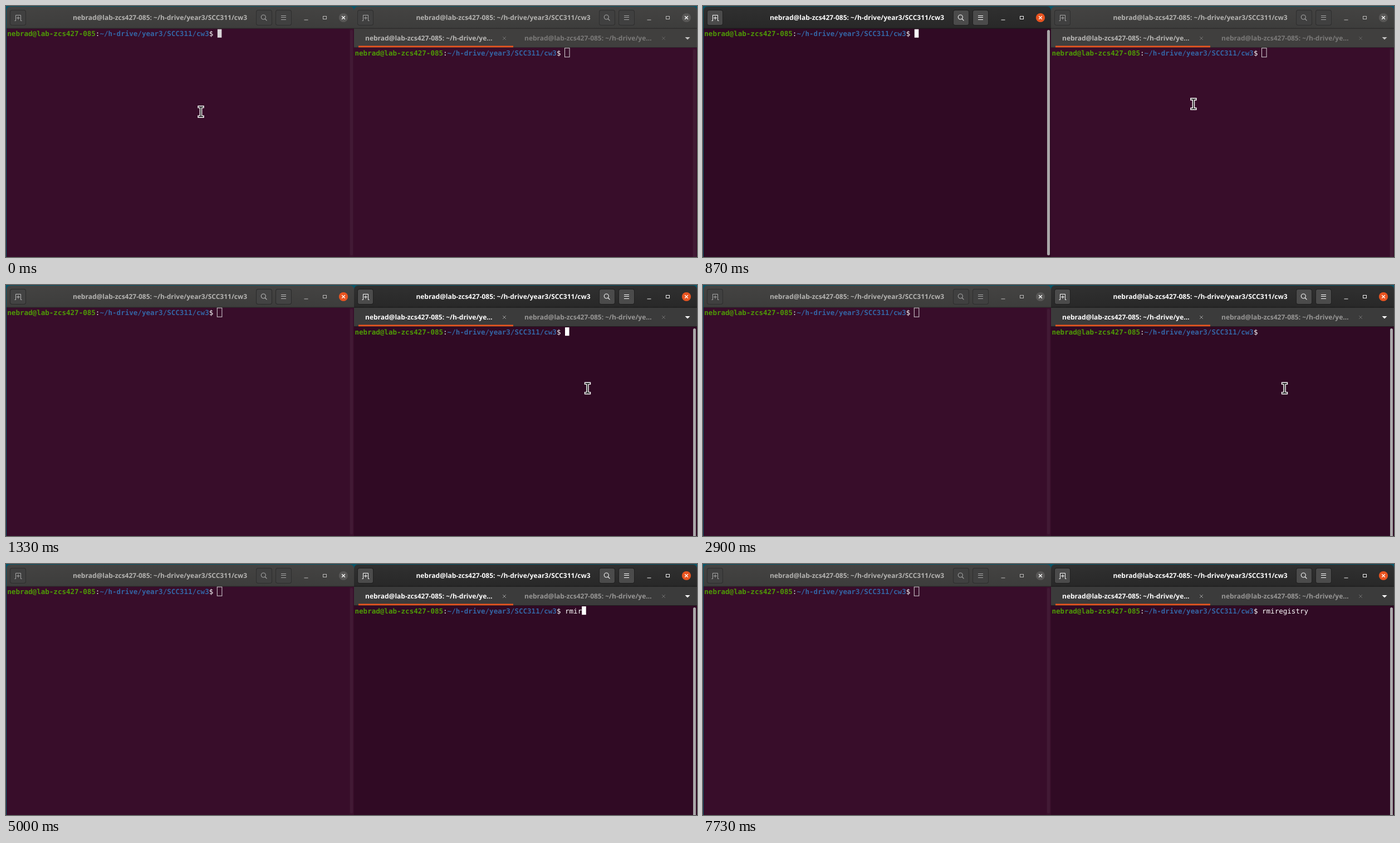
Write an HTML page with a canvas that moves like this. It is 1241 by 451 pixels and loops after 8000 ms.

```html
<!DOCTYPE html>
<html lang="en">
<head>
<meta charset="utf-8">
<title>Two terminals</title>
<style>
  html, body { margin: 0; width: 1241px; height: 451px; overflow: hidden; background: #07566a; }
  canvas { display: block; }
</style>
</head>
<body>
<canvas id="stage" width="1241" height="451"></canvas>
<script>
const ctx = document.getElementById('stage').getContext('2d');
const LOOP = 8000, CELL = 7.55, ROW = 15.1;
const HEAD_END = 40.6, TABS_END = 75;
const HOST = 'nebrad@lab-zcs427-085', PATH = '~/h-drive/year3/SCC311/cw3';
const TITLE = HOST + ': ' + PATH;
const TAB = HOST + ': ~/h-drive/ye…';
const UI = 'bold 12px "Open Sans", "Noto Sans", sans-serif';
const MONO = '12.54px "DejaVu Sans Mono", monospace';
const ORANGE = '#e95420';

const FOCUS_LEFT = 370, FOCUS_RIGHT = 1130, FIRST_KEY = 2940;
const COMMAND = 'rmiregistry';
const KEYS = [FIRST_KEY, 3230, 3300, 5000, 5100, 5630, 5770, 6130, 6470, 6870, 7170];
const BLINK_OFF = [[970, FOCUS_RIGHT], [1700, 2300], [2900, FIRST_KEY], [3900, 4430], [7730, LOOP]];
// time, x, y, easing applied on the way to this point
const POINTER = [
  [20, 350, 190, p => p],
  [200, 416, 134, p => 1 - (1 - p) ** 1.5],
  [370, 416, 134, p => p],
  [870, 880, 176, p => p ** 1.3],
  [1200, 1044.5, 185.5, p => 1 - (1 - p) ** 1.8]
];

const ramp = (t, a, b) => Math.min(1, Math.max(0, (t - a) / (b - a)));
const gray = (a, b, f) => {
  const v = Math.round(a + (b - a) * f);
  return `rgb(${v},${v},${v})`;
};

function rect(x, y, w, h, color) {
  ctx.fillStyle = color;
  ctx.fillRect(x, y, w, h);
}

function rounded(x, y, w, h, r, color) {
  ctx.fillStyle = color;
  ctx.beginPath();
  ctx.roundRect(x, y, w, h, r);
  ctx.fill();
}

function lines(color, width, ...paths) {
  ctx.strokeStyle = color;
  ctx.lineWidth = width;
  ctx.beginPath();
  for (const p of paths) {
    ctx.moveTo(p[0], p[1]);
    for (let i = 2; i < p.length; i += 2) ctx.lineTo(p[i], p[i + 1]);
  }
  ctx.stroke();
}

function cross(x, y, r, color, width) {
  lines(color, width, [x - r, y - r, x + r, y + r], [x + r, y - r, x - r, y + r]);
}

function label(text, x, y, color, align) {
  ctx.font = UI;
  ctx.textAlign = align;
  ctx.fillStyle = color;
  ctx.fillText(text, x, y);
}

function cells(text, x, y, color, bold) {
  ctx.font = (bold ? 'bold ' : '') + MONO;
  ctx.textAlign = 'left';
  ctx.fillStyle = color;
  [...text].forEach((c, i) => ctx.fillText(c, x + i * CELL, y));
  return x + text.length * CELL;
}

function prompt(x, y, typed) {
  x = cells(HOST, x, y, '#4e9a06', true);
  x = cells(':', x, y, '#eeeeec');
  x = cells(PATH, x, y, '#3465a4', true);
  return cells('$ ' + typed, x, y, '#ffffff');
}

function caret(x, y, mode) {
  if (mode === 'hollow') {
    ctx.strokeStyle = '#d8d2d6';
    ctx.lineWidth = 1;
    ctx.strokeRect(x - 0.5, y - 0.5, CELL + 1, ROW + 1);
  } else if (mode) {
    rect(x, y, CELL, ROW, mode);
  }
}

const blank = t => BLINK_OFF.some(([a, b]) => t >= a && t < b);

function button(x, f) {
  rounded(x, 7, 29, 28, 4, gray(46, 32, f));
  rounded(x + 1, 8, 27, 26, 3, gray(64, 75, f));
}

function header(x, w, cx, right, focused, f, closeOn) {
  const g = ctx.createLinearGradient(0, 1, 0, 40);
  g.addColorStop(0, focused ? '#303030' : '#444342');
  g.addColorStop(1, focused ? '#282828' : '#3d3d3c');
  rounded(x, 1, w, HEAD_END - 1, [7, 7, 0, 0], g);
  rect(x, HEAD_END - 0.9, w, 0.9, focused ? '#161616' : '#232222');
  label(TITLE, cx, 25, focused ? '#ffffff' : '#b4b3b1', 'center');

  const ink = gray(166, 250, f);
  const bx = x + 6;
  button(bx, f);
  lines(ink, 1, [bx + 8.5, 26.5, bx + 10.5, 26.5, bx + 10.5, 16.5, bx + 19.5, 16.5,
    bx + 19.5, 26.5, bx + 21.5, 26.5], [bx + 15, 18.5, bx + 15, 24.5], [bx + 12, 21.5, bx + 18, 21.5]);

  const sx = right - 176;
  button(sx, f);
  ctx.strokeStyle = ink;
  ctx.lineWidth = 1.1;
  ctx.beginPath();
  ctx.arc(sx + 13.3, 20, 4, 0, Math.PI * 2);
  ctx.moveTo(sx + 16.2, 23);
  ctx.lineTo(sx + 19.5, 26.3);
  ctx.stroke();

  const mx = right - 141;
  button(mx, f);
  for (const y of [17.5, 20.5, 24.5]) lines(ink, 1, [mx + 10, y, mx + 19, y]);

  const mark = focused ? '#f2f2f2' : '#bdbcbb';
  lines(mark, 1, [right - 89.5, 25, right - 82.5, 25]);
  ctx.strokeStyle = mark;
  ctx.strokeRect(right - 55.5, 18.5, 6, 5);
  ctx.fillStyle = closeOn ? ORANGE : '#595857';
  ctx.beginPath();
  ctx.arc(right - 19, 21, 8.1, 0, Math.PI * 2);
  ctx.fill();
  cross(right - 19, 21, 2.8, '#ffffff', 1.4);
}

function body(x, y, w, focused) {
  rect(x, Math.floor(y), w, 451, focused ? '#300a24' : '#380d2a');
}

function scrollbar(x, y, h, focused) {
  if (focused) {
    rounded(x, y, 5, h, 2.5, '#aaa7a9');
  } else {
    rect(x - 1, y - 2, 7, 451, '#3b112d');
    rounded(x, y, 5, h, 2.5, '#421a35');
  }
}

function leftWindow(t) {
  const focused = t >= FOCUS_LEFT && t < FOCUS_RIGHT;
  const f = ramp(t, 390, 570) * (1 - ramp(t, FOCUS_RIGHT, 1400));
  body(1, HEAD_END, 624, focused);
  header(1, 624, 276.5, 625, focused, f, t >= FOCUS_LEFT && t < 1400);
  scrollbar(618, 43, 405, focused);
  const x = prompt(2.3, 54, '');
  const mode = t < FOCUS_LEFT ? '#d9d5d8' : !focused ? 'hollow' : blank(t) ? '' : '#ffffff';
  caret(x, 41.7, mode);
}

function rightWindow(t) {
  const focused = t >= FOCUS_RIGHT;
  const f = ramp(t, FOCUS_RIGHT, 1330);
  body(625, TABS_END, 616, focused);
  rect(625, 40, 616, TABS_END - 40, focused ? '#3b3b3b' : '#403f3e');
  header(625, 616, 893, 1241, focused, f, focused);

  rect(625, TABS_END - 0.9, 616, 0.9, focused ? '#1f1c1e' : '#2b2529');
  rect(633, TABS_END - 3.5, 278, 2.8, ORANGE);
  label(TAB, 645, 62, focused ? '#ffffff' : '#b8b7b5', 'left');
  label(TAB, 931, 62, focused ? '#989796' : '#7b7a79', 'left');
  cross(895, 58, 2.8, focused ? '#a2a2a2' : '#777675', 1);
  cross(1181, 58, 2.8, focused ? '#717070' : '#636261', 1);
  ctx.fillStyle = focused ? '#ffffff' : '#c4c3c2';
  ctx.beginPath();
  ctx.moveTo(1219.5, 56);
  ctx.lineTo(1228.5, 56);
  ctx.lineTo(1224, 60.5);
  ctx.fill();

  scrollbar(1234, 78, 380, focused);
  const typed = COMMAND.slice(0, KEYS.filter(k => t >= k).length);
  const x = prompt(626.5, 88.5, typed);
  caret(x, 76.1, !focused ? 'hollow' : blank(t) ? '' : '#ffffff');
}

function pointerAt(t) {
  let prev = POINTER[0];
  for (const key of POINTER) {
    if (t < key[0]) {
      const p = key[3](ramp(t, prev[0], key[0]));
      return [1, 2].map(i => prev[i] + (key[i] - prev[i]) * p);
    }
    prev = key;
  }
  return [prev[1], prev[2]];
}

function pointer(t) {
  if (t >= FIRST_KEY) return;
  const [x, y] = pointerAt(t);
  const beam = (color, width, r) => lines(color, width,
    [x - r, y - 8.7, x + r, y - 8.7], [x, y - 8.7, x, y + 8.7], [x - r, y + 8.7, x + r, y + 8.7]);
  beam('#ffffff', 4.6, 5.7);
  beam('#161616', 1.7, 4.2);
}

function draw(t) {
  rect(0, 0, 1241, 451, '#07566a');
  leftWindow(t);
  rightWindow(t);
  pointer(t);
}

ctx.textRendering = 'geometricPrecision';
const start = performance.now();
function tick() {
  draw((performance.now() - start) % LOOP);
  requestAnimationFrame(tick);
}
tick();
</script>
</body>
</html>
```
